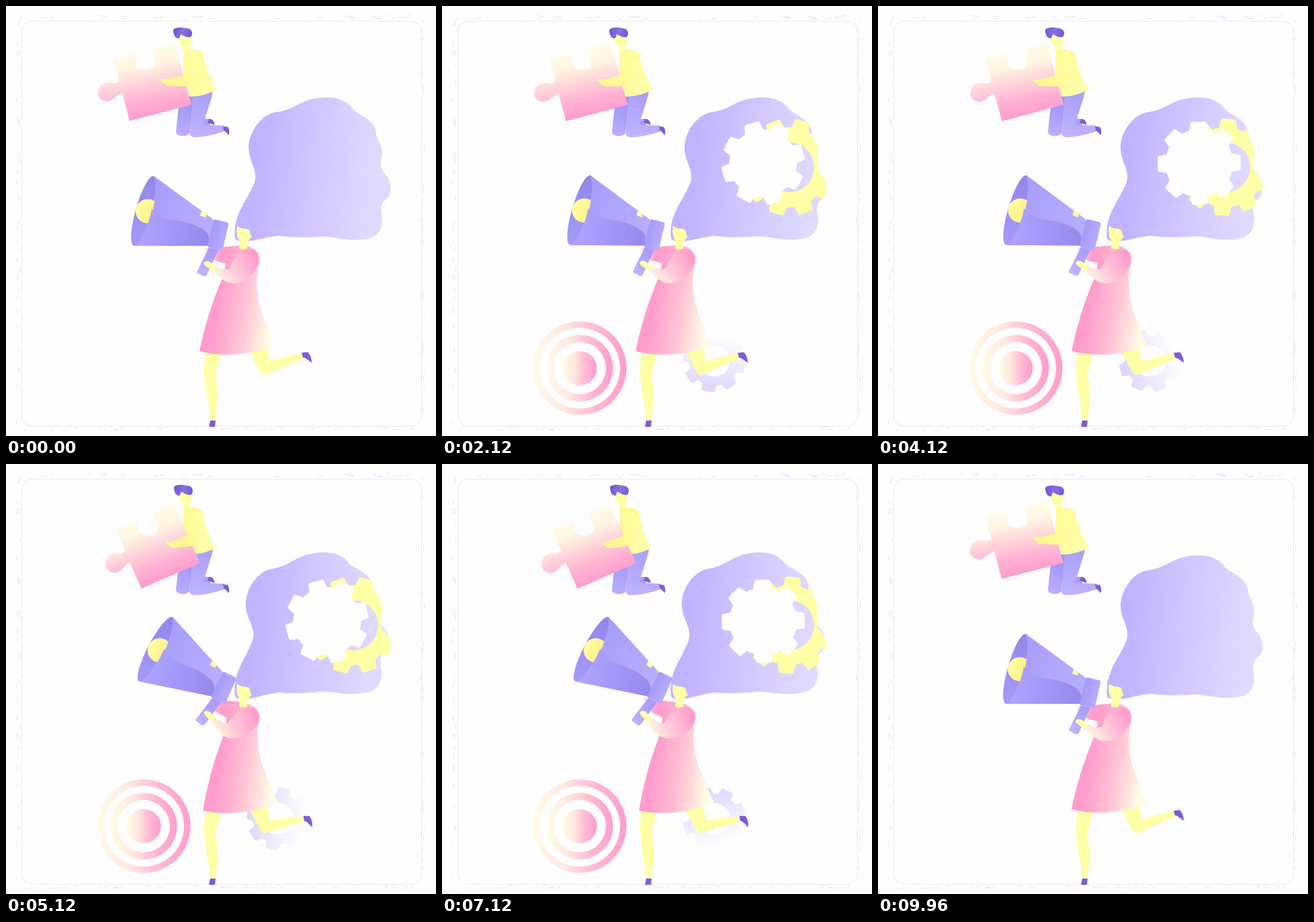
An HTML page with a canvas that plays this animation: 640 px wide and 640 px high, repeating every 10 s.

```html
<!DOCTYPE html>
<html lang="en">
<head>
<meta charset="utf-8">
<title>Teamwork illustration</title>
<style>
html, body { margin: 0; width: 100%; height: 100%; overflow: hidden; background: #fefefe; }
canvas { display: block; width: 100vw; height: 100vh; }
</style>
</head>
<body>
<canvas id="stage" width="640" height="640"></canvas>
<script>
const ctx = document.getElementById('stage').getContext('2d');
const LOOP = 10000;
const rad = deg => deg * Math.PI / 180;
const shape = d => new Path2D(d);

function gradient(x0, y0, x1, y1, ...colors) {
  const g = ctx.createLinearGradient(x0, y0, x1, y1);
  colors.forEach((c, i) => g.addColorStop(i / (colors.length - 1), c));
  return g;
}

function fill(path, paint) {
  ctx.fillStyle = paint;
  ctx.fill(path);
}

function turned(deg, x, y, draw) {
  ctx.save();
  ctx.translate(x, y);
  ctx.rotate(rad(deg));
  ctx.translate(-x, -y);
  draw();
  ctx.restore();
}

const SKIN = '#ffffa6', SHOE = '#7c5cdb', LILAC = '#beb4ff', PINK = '#ff9ccd', CREAM = '#fffde8';

const hair = shape('M341 346C338 320 350 300 360 283C371 263 373 258 370 245C366 230 361 225 361 208C364 180 385 160 402 158C425 155 430 147 450 140C480 132 505 136 517 154C525 162 551 170 551 190C550 197 561 205 560 222C556 240 558 243 566 252C577 268 573 283 563 290C555 298 560 310 560 322C557 345 540 347 525 348C495 349 480 340 460 344C440 344 430 345 405 342C385 344 370 350 358 350C350 350 343 350 341 346Z');
const hairPaint = gradient(370, 230, 550, 250, '#beb3ff', '#d0c8ff', '#e0daff');

const woman = {
  head: shape('M344 327C350 333 356 330 362 333L364 340L366 344L363 346C362 350 361 350 359 350L359 361Q353 364 347 361L348 350C344 345 342 335 344 327Z'),
  dress: shape('M331 360C345 355 360 355 368 361C378 367 380 380 375 390C371 420 374 440 386 470C392 488 398 500 400 506Q345 527 288 514C295 480 305 445 322 405C326 390 330 375 331 360Z'),
  farArm: shape('M292 359C310 363 330 356 352 357L348 372L330 384C322 382 316 380 312 379L300 368Z'),
  nearArm: shape('M352 363C366 357 380 366 376 382C372 400 350 416 332 412C322 408 312 400 306 393L313 387C322 392 330 394 334 390C336 380 344 370 352 363Z'),
  hand: shape('M294 383C296 378 303 379 308 385L313 388L307 394C301 389 296 388 294 383Z'),
  frontLeg: shape('M297 515L320 516C316 535 311 545 312 555C316 570 316 590 311 618L304 618C303 590 293 560 295 535Z'),
  frontShoe: shape('M304 617L312 617L311 626Q306 627 302 626Z'),
  thigh: shape('M362 514L388 509L393 528L388 548Q383 551 380 547Z'),
  shin: shape('M384 532C400 527 420 520 441 517L443 524C425 532 405 540 387 549Q378 549 379 538Z'),
  backShoe: shape('M440 516L449 515C454 520 455 527 455 531C450 527 447 524 442 523Z')
};

const horn = {
  body: shape('M220 253C228 285 214 340 191 357L312 357L309 318Z'),
  shade: shape('M217 302C235 325 260 315 285 328C300 335 304 340 303 357L191 357C202 350 213 325 217 302Z'),
  block: shape('M313 318L329 322Q332 323 331 326L323 361Q322 364 318 363L302 359Q299 358 300 355L309 320Q310 317 313 318Z'),
  grip: shape('M302 359L316 363L299 400Q297 403 294 402L286 398Q283 397 285 394Z'),
  button: shape('M291 305L299 309L297 315L289 312Z')
};

const man = {
  hair: shape('M249 38C247 32 260 31 268 33C275 33 279 38 276 45C272 48 268 46 264 44L260 42L258 48C253 49 250 45 249 38Z'),
  face: shape('M256 42L276 44C277 50 276 57 272 60L276 68L264 72L264 61C259 58 256 52 256 42Z'),
  torso: shape('M265 68C280 62 292 66 294 74C298 95 306 112 314 124Q295 135 274 135L264 100Z'),
  nearLeg: shape('M278 132L308 127C306 140 296 165 294 177L324 178L326 186C310 192 290 196 278 195C272 194 273 185 274 180Z'),
  farLeg: shape('M258 140L284 130L274 178L273 190C266 196 253 194 253 187Z'),
  farFoot: shape('M292 178L296 168L303 168L304 178Z'),
  farShoe: shape('M302 168C308 168 311 173 310 177C306 176 304 174 300 174Z'),
  shoe: shape('M323 179L330 180C333 185 333 190 331 192C328 188 326 186 324 185Z'),
  arm: shape('M268 75C275 66 290 70 292 85C290 105 284 116 270 120L240 119L240 109L262 104C266 95 264 85 268 75Z'),
  hand: shape('M229 109L240 108L241 119C235 118 236 113 229 111Z'),
  puzzle: shape('M160 78L191 70C194 76 192 80 194 86C198 98 222 98 223 84C224 76 216 72 218 63L251 54L276 147L184 171L173 130C165 131 161 141 150 142C140 141 136 134 137 127C139 115 150 112 157 114C162 116 165 114 169 112Z')
};

function gearPath(teeth, outer, root, hole) {
  const p = new Path2D();
  const step = 2 * Math.PI / teeth;
  const at = (r, a) => p.lineTo(r * Math.cos(a), r * Math.sin(a));
  for (let i = 0; i < teeth; i++) {
    const a = i * step;
    at(root, a - .31 * step);
    at(outer, a - .2 * step);
    at(outer, a + .2 * step);
    at(root, a + .31 * step);
    p.arc(0, 0, root, a + .31 * step, a + .69 * step);
  }
  p.closePath();
  if (hole) {
    p.moveTo(hole, 0);
    p.arc(0, 0, hole, 0, 2 * Math.PI, true);
  }
  return p;
}

// The round-joined stroke softens the teeth and adds 2.5px on every edge.
function gear(path, x, y, deg, scale, paint) {
  if (scale <= .002) return;
  ctx.save();
  ctx.translate(x, y);
  ctx.rotate(rad(deg));
  ctx.scale(scale, scale);
  ctx.fillStyle = ctx.strokeStyle = paint;
  ctx.lineWidth = 5;
  ctx.lineJoin = 'round';
  ctx.fill(path, 'evenodd');
  ctx.stroke(path);
  ctx.restore();
}

const whiteGear = gearPath(8, 60, 48, 0);
const yellowGear = gearPath(10, 70, 57, 39.5);
const smallGear = gearPath(8, 44.5, 35, 26);
const smallPaint = gradient(0, -38, 0, 46, '#fefefe', '#dcd6ff');

function backOut(u) {
  u = Math.min(1, Math.max(0, u)) - 1;
  return 1 + 2.3 * u ** 3 + 1.3 * u ** 2;
}

function presence(t, start) {
  const out = Math.min(1, Math.max(0, (t - 8.5) / 1));
  return backOut((t - start) / 1.2) * (1 + Math.cos(Math.PI * out)) / 2;
}

function drawFrame() {
  let seed = 7;
  const rnd = () => (seed = seed * 16807 % 2147483647) / 2147483647;
  ctx.strokeStyle = '#eae7fb';
  ctx.lineWidth = 1;
  ctx.beginPath();
  ctx.roundRect(23.5, 22.5, 595, 603, 16);
  ctx.stroke();
  ctx.fillStyle = '#e6e2fa';
  for (let i = 0; i < 160; i++) {
    const along = 20 + rnd() * 600, off = rnd() * 5, len = 2 + rnd() * 7;
    const side = i % 4;
    if (side === 0) ctx.fillRect(along, 14 + off, len, 1);
    if (side === 1) ctx.fillRect(along, 626 + off, len, 1);
    if (side === 2) ctx.fillRect(15 + off, along, 1, len);
    if (side === 3) ctx.fillRect(617 + off, along, 1, len);
  }
}

function drawTarget(scale) {
  if (scale <= .002) return;
  ctx.save();
  ctx.translate(205, 539);
  ctx.scale(scale, scale);
  for (const [r, gap] of [[69.5, 60], [49.5, 39], [25.5, 0]]) {
    const ring = gradient(-r, 0, r, 0, CREAM, '#ffe8df', '#ffb9d3', PINK);
    for (const [size, paint] of [[r, ring], [gap, '#fefefe']]) {
      ctx.beginPath();
      ctx.arc(0, 0, size, 0, 2 * Math.PI);
      ctx.fillStyle = paint;
      ctx.fill();
    }
  }
  ctx.restore();
}

function drawMan(s) {
  fill(man.farFoot, '#a9a0f5');
  fill(man.farShoe, SHOE);
  fill(man.farLeg, gradient(256, 190, 276, 138, '#b8aeff', '#9c92f2'));
  fill(man.nearLeg, gradient(275, 190, 300, 132, LILAC, '#a9a0fa'));
  fill(man.shoe, SHOE);
  turned(2.5 * s, 285, 64, () => {
    fill(man.face, SKIN);
    fill(man.hair, gradient(250, 36, 277, 42, '#7258d2', '#8a70e2', '#7457d0'));
    fill(man.torso, gradient(268, 90, 308, 110, '#fff89a', '#ffffa8'));
  });
  turned(-9.3 * s, 285, 66, () => {
    fill(man.puzzle, gradient(205, 62, 226, 162, CREAM, '#fff6e2', '#ffd4da', '#ffb3d3', PINK));
    fill(man.arm, gradient(240, 115, 290, 90, '#fff58e', '#ffffa2'));
    fill(man.hand, '#fff89c');
  });
}

function drawHorn() {
  ctx.beginPath();
  ctx.ellipse(205, 305, 12, 54, rad(16), 0, 2 * Math.PI);
  ctx.fillStyle = gradient(210, 255, 194, 355, '#9387ea', '#a59afa');
  ctx.fill();
  ctx.beginPath();
  ctx.arc(211, 305.5, 18, 0, 2 * Math.PI);
  ctx.fillStyle = gradient(193, 300, 218, 310, '#ffffa0', '#fff08e');
  ctx.fill();
  fill(horn.body, gradient(215, 290, 305, 335, '#a89efa', '#b8aeff'));
  fill(horn.shade, gradient(200, 340, 303, 345, '#ada3ff', '#958aeb'));
  fill(horn.button, '#ffffa0');
  fill(horn.grip, gradient(288, 395, 312, 365, '#bcb2ff', '#a79cf6'));
  fill(horn.block, gradient(305, 335, 328, 342, '#a69bf5', '#b5abff'));
}

function drawWoman(s) {
  fill(woman.thigh, SKIN);
  turned(8 * s, 384, 540, () => {
    fill(woman.shin, SKIN);
    fill(woman.backShoe, SHOE);
  });
  fill(woman.frontLeg, SKIN);
  fill(woman.frontShoe, SHOE);
  turned(12 * s, 359, 379, () =>
    fill(woman.farArm, gradient(292, 365, 345, 370, CREAM, PINK, '#ffa6d0')));
  turned(-2.3 * s, 345, 380, () =>
    fill(woman.dress, gradient(315, 440, 396, 454, PINK, '#ffc3d4', '#fffbe6')));
  turned(12 * s, 359, 379, () => {
    drawHorn();
    fill(woman.nearArm, gradient(312, 398, 368, 366, '#fff3e0', '#ffc4d8', PINK));
    fill(woman.hand, SKIN);
  });
  fill(woman.head, SKIN);
}

function draw(t) {
  const s = (1 - Math.cos(Math.PI * t)) / 2;
  const spin = 30 * (t - 2.12);
  ctx.fillStyle = '#fefefe';
  ctx.fillRect(0, 0, 640, 640);
  drawFrame();
  drawTarget(presence(t, .1));
  gear(smallGear, 405, 528, 11 + spin, presence(t, .8), smallPaint);
  turned(-2 * s, 343, 340, () => fill(hair, hairPaint));
  ctx.save();
  ctx.clip(hair);
  // Ten teeth mesh with eight, so this gear turns the other way at 8/10 speed.
  gear(yellowGear, 517, 240, -2 - spin * .8, presence(t, .6), SKIN);
  gear(whiteGear, 478, 234, -16 + spin, presence(t, .4), '#fefefe');
  ctx.restore();
  drawMan(s);
  drawWoman(s);
}

const begin = performance.now();
function tick() {
  draw((performance.now() - begin) % LOOP / 1000);
  requestAnimationFrame(tick);
}
tick();
</script>
</body>
</html>
```
